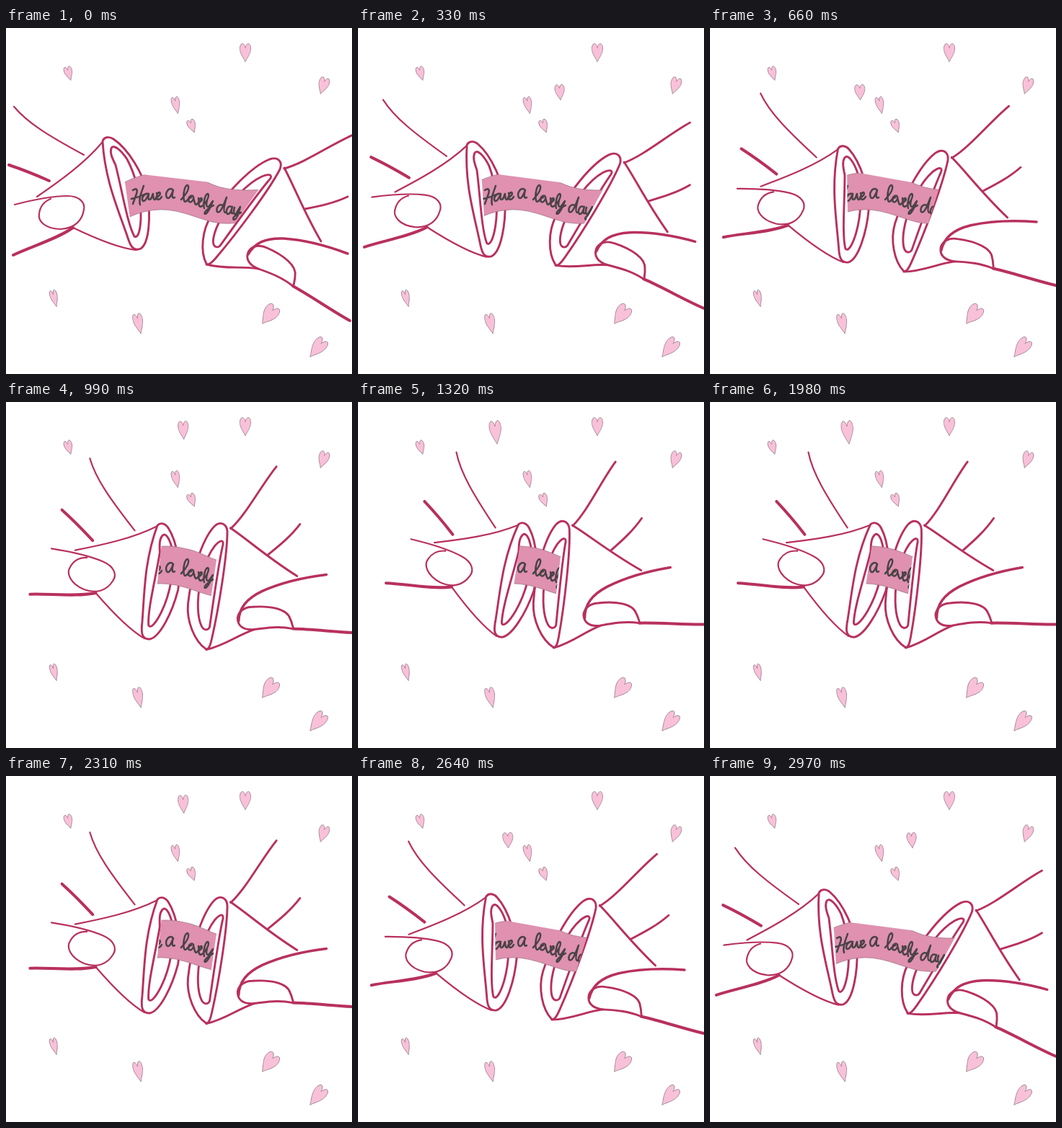
An HTML page for the animation above (3300 ms loop, 480x480 px).

```html
<!DOCTYPE html>
<html lang="en">
<head>
<meta charset="utf-8">
<title>Have a lovely day</title>
<style>
html, body { margin: 0; width: 100%; height: 100%; overflow: hidden; background: #fff; }
svg { display: block; width: 100%; height: 100%; }
path { fill: none; stroke-linecap: round; stroke-linejoin: round; }
.hand { stroke: #b8305f; stroke-width: 2.9; }
.thin { stroke-width: 2.2; }
.bold { stroke-width: 4; }
.heart { fill: #f9c1d9; stroke: #8d7681; stroke-width: .8; stroke-dasharray: 1.2 1; }
.ribbon { fill: #df91af; stroke: #98707f; stroke-width: .8; stroke-dasharray: 1.2 1; }
.ink { stroke: #4a4346; stroke-width: 2.5; }
</style>
</head>
<body>
<svg viewBox="0 0 480 480" role="img" aria-label="Have a lovely day">
<defs><clipPath id="gap"><polygon id="edge"/></clipPath></defs>
<g id="hearts"></g>
<g id="left" class="hand">
  <path class="thin" d="M11 109C30 132 60 150 108 176"/>
  <path class="bold" d="M4 190C22 196 42 204 60 212"/>
  <path class="thin" d="M43 234C75 212 110 187 134 158"/>
  <path class="thin" d="M12 245C35 239 60 233 85 233C103 233 110 243 108 252C106 266 96 278 76 279C55 279 44 268 46 258C47 248 52 241 62 237"/>
  <path class="bold" d="M10 315C35 303 70 293 93 277"/>
  <path class="thin" d="M93 277C120 290 155 305 180 308"/>
  <path d="M134 157C136 151 143 150 149 154C170 168 190 202 196 228C201 260 199 298 187 306C176 311 172 301 168 288C155 250 137 210 134 157"/>
  <path d="M146 167C149 160 160 170 168 182C180 205 188 235 187 265C186 285 182 292 178 289C168 270 161 225 152 190C147 180 144 173 146 167"/>
</g>
<g id="right" class="hand">
  <path d="M386 195C415 187 450 162 482 148"/>
  <path d="M415 251C435 247 455 243 474 234"/>
  <path d="M386 194C400 220 412 253 437 296"/>
  <path d="M278 327C269 310 272 280 285 260C305 230 340 192 366 182C378 178 384 186 380 196C365 225 320 285 292 318C286 325 281 330 278 327"/>
  <path d="M290 303C285 300 287 285 298 265C312 240 335 215 355 206C368 201 371 205 364 212C345 235 320 270 297 302C294 305 292 304 290 303"/>
  <path d="M278 328C305 335 325 330 350 334C367 340 383 346 398 358"/>
  <path class="bold" d="M398 358C425 373 450 391 477 406"/>
  <path d="M350 334C335 328 332 318 337 309C342 302 352 300 362 305C385 315 404 330 401 344C401 350 399 354 399 358"/>
  <path style="stroke-width:3.5" d="M336 314C345 298 360 291 385 292C415 294 445 302 474 313"/>
</g>
<g clip-path="url(#gap)">
  <path class="ribbon" d="M150 222Q185 200 222 200C262 200 282 219 303 222C320 226 340 225 360 224L340 268Q320 272 300 271C275 270 248 252 215 252Q188 252 160 268Z"/>
  <path class="ink" d="M176 225C181 221 183 225 181 230L176 244M191 219C187 230 184 238 186 245M174 237Q184 235 194 230M198 230C192 228 187 237 190 240C193 241 196 235 198 230C197 236 197 240 201 237C203 234 203 231 204 230C204 235 205 239 207 238C209 236 210 232 209 229M208 235C213 234 215 230 213 228C209 228 208 237 211 238Q214 238 216 234"/>
  <path class="ink" d="M231 224C226 220 220 229 223 235C226 239 230 231 232 225C230 231 230 238 234 235"/>
  <path class="ink" d="M243 238C249 232 256 222 252 218C248 217 245 232 247 239C248 243 251 240 253 237C254 233 258 231 260 234C261 238 257 243 254 241C252 239 254 235 257 235M260 236C262 240 261 245 264 245C267 243 268 239 267 236M266 243C271 241 273 238 271 236C267 237 266 247 270 248C277 245 283 233 280 230C276 230 273 245 275 250M279 239C277 245 278 250 282 247L287 240C284 248 279 258 276 258C274 257 278 251 288 246"/>
  <path class="ink" d="M301 246C295 243 291 250 293 255C297 258 301 248 306 235C303 245 301 255 304 256M313 248C308 245 304 254 307 258C311 259 313 252 314 248C312 254 312 260 316 256M317 249C315 255 316 260 319 258L325 248C323 257 320 266 316 266C313 264 318 259 326 256"/>
</g>
</svg>
<script>
const STEP = 330, STEPS = 10;
const get = id => document.getElementById(id);

// hearts: centre x, y, width, height, tilt
const still = [
  [87, 63, 11, 20, -16], [332, 34, 15, 26, 0], [440, 80, 14, 24, 18],
  [236, 107, 11, 24, -12], [258, 136, 11, 19, -20], [67, 375, 10, 24, -15],
  [184, 410, 13, 29, -13], [365, 398, 20, 31, 38], [432, 444, 18, 32, 40]
];
// hands: dx, dy, turn; gap: ribbon ends as x, y from top left, clockwise
const poses = [
  { left: [0, 0, 0], right: [0, 0, 0], gap: [163, 200, 352, 222, 316, 273, 172, 264] },
  { left: [10, -4, 7], right: [-10, -8, -5.3], gap: [171, 200, 341, 222, 313, 273, 175, 262],
    heart: [280, 89, 13, 22, -5] },
  { left: [30.4, -9, 14.2], right: [-30, -16.6, -16.2], gap: [190, 198, 318, 221, 302, 274, 191, 262],
    heart: [208, 89, 14, 22, -3] },
  { left: [57, -19.4, 23.5], right: [-40, -26, -27.6], gap: [216, 196, 293, 212, 284, 274, 209, 260],
    heart: [246, 39, 14, 26, -3] },
  { left: [67.5, -28, 28], right: [-51, -31.3, -30.2], gap: [225, 196, 282, 206, 274, 274, 215, 262],
    heart: [191, 42, 16, 33, -7] },
  { left: [72, -32, 31], right: [-57, -34, -32.5], gap: [232, 196, 274, 206, 267, 274, 220, 262],
    heart: [270, 28, 15, 29, -3] }
];

function addHeart() {
  const p = document.createElementNS("http://www.w3.org/2000/svg", "path");
  p.setAttribute("class", "heart");
  get("hearts").append(p);
  return p;
}

function setHeart(el, [x, y, w, h, tilt]) {
  const a = w / 2, b = h / 2;
  el.setAttribute("d", `M0 ${-b * .5}C${-a * .3} ${-b * 1.25} ${-a * 1.1} ${-b} ${-a} ${-b * .3}C${-a * .9} ${b * .2} ${-a * .3} ${b * .6} 0 ${b}C${a * .3} ${b * .6} ${a * .9} ${b * .2} ${a} ${-b * .3}C${a * 1.1} ${-b} ${a * .3} ${-b * 1.25} 0 ${-b * .5}Z`);
  el.setAttribute("transform", `translate(${x} ${y}) rotate(${tilt})`);
}

function setHand(id, [dx, dy, turn], pivot) {
  get(id).setAttribute("transform", `translate(${dx} ${dy}) rotate(${turn} ${pivot})`);
}

still.forEach(h => setHeart(addHeart(), h));
const rover = addHeart();

function draw(t) {
  const i = Math.floor(t / STEP) % STEPS;
  const pose = poses[Math.min(i, STEPS - i)];
  setHand("left", pose.left, "62.6 219.6");
  setHand("right", pose.right, "382.5 267.8");
  get("edge").setAttribute("points", pose.gap.join(" "));
  rover.style.display = pose.heart ? "" : "none";
  if (pose.heart) setHeart(rover, pose.heart);
}

const start = performance.now();
function tick() {
  draw(performance.now() - start);
  requestAnimationFrame(tick);
}
tick();
</script>
</body>
</html>
```
